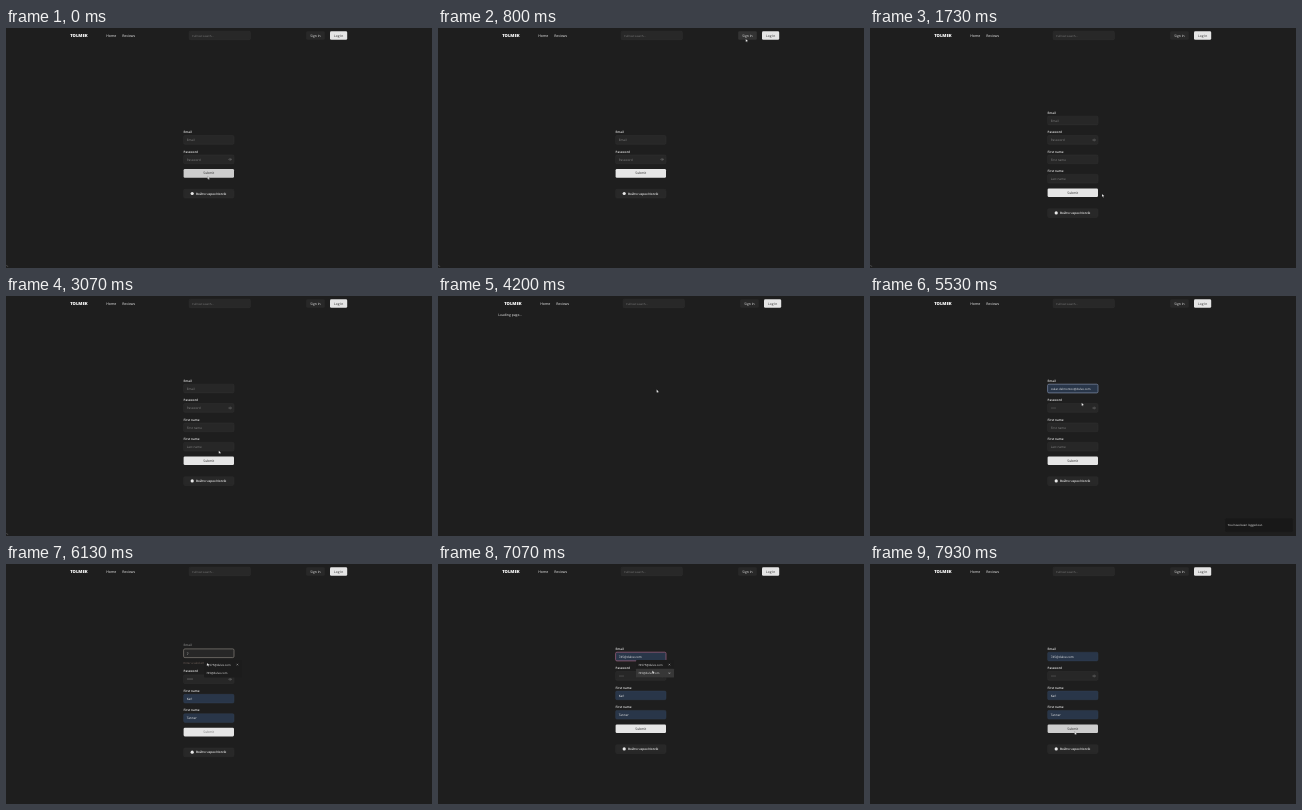
Recreate the animation shown at these times as an HTML page. Size 426 by 240 pixels, loop 8000 ms.

```html
<!DOCTYPE html>
<html lang="en">
<head>
<meta charset="utf-8">
<title>Sign-up form</title>
<style>
  html, body { margin: 0; width: 100%; height: 100%; overflow: hidden; background: #1e1e1e; }
  svg { display: block; width: 426px; height: 240px; }
  text { font-family: "Open Sans", "Noto Sans", sans-serif; text-rendering: geometricPrecision; white-space: pre; }
</style>
</head>
<body>
<svg id="stage" viewBox="0 0 426 240"></svg>
<script>
const LOOP = 8000;
const ROW = 19.4;
const LEFT = 177.6, WIDTH = 50.4;
const stage = document.getElementById('stage');

const MAILS = [
  'valentinogreyshamot@dulve.com', 'oskar.delmontov@dulve.com', 'brasko7171@dulve.com',
  '74575@dulve.com', '7@dulve.com', 'mark@sampler.com'
];
const SHORT_MAILS = ['74575@dulve.com', '745@dulve.com'];

// Pointer stops: time, x, y
const PATH = [
  [0, 201.6, 148.3], [70, 201.6, 148.3], [870, 310, 8], [1400, 310, 8],
  [1730, 232, 166], [2200, 211, 173], [2800, 211, 173], [3670, 218.6, 93.6],
  [4400, 218.6, 93.6], [4600, 207, 92], [5000, 217.3, 114.8], [5400, 217.3, 114.8],
  [5730, 201, 92], [5870, 201, 92], [6130, 201, 99], [6600, 214.3, 106.6],
  [7130, 214.3, 106.6], [7870, 204.6, 167.6], [8000, 204.6, 167.6]
];

const during = (t, from, to) => t >= from && t < to;

function pointerAt(t) {
  const i = Math.max(1, PATH.findIndex(p => p[0] > t));
  const [t0, x0, y0] = PATH[i - 1], [t1, x1, y1] = PATH[i];
  const u = (t - t0) / (t1 - t0), k = u * u * (3 - 2 * u);
  return { x: x0 + (x1 - x0) * k, y: y0 + (y1 - y0) * k };
}

const inside = (p, x, y, w, h) => p.x >= x && p.x <= x + w && p.y >= y && p.y <= y + h;

// Text is placed by the vertical middle of its letters
function text(x, y, str, size = 3.1, fill = '#eee', weight = 400, anchor = 'start') {
  return `<text x="${x}" y="${y + size * 0.36}" font-size="${size}" fill="${fill}" font-weight="${weight}" text-anchor="${anchor}">${str}</text>`;
}

function box(x, y, w, h, fill, stroke = 'none', r = 1.3, line = 0.4) {
  return `<rect x="${x}" y="${y}" width="${w}" height="${h}" rx="${r}" fill="${fill}" stroke="${stroke}" stroke-width="${line}"/>`;
}

function header(p, shift) {
  const hover = inside(p, 300, 3, 19, 9);
  return `<g transform="translate(${shift} 0)">` +
    text(64.2, 7.6, 'TOLMEK', 4.2, '#fff', 800) +
    text(100.2, 7.6, 'Home', 3.6, '#eee', 500) +
    text(116.2, 7.6, 'Reviews', 3.5, '#eee', 500) +
    box(183.2, 3.2, 61.2, 8.5, '#282828', '#343434') +
    text(186.3, 7.6, 'Full text search...', 2.75, '#808080') +
    box(300.2, 3.2, 18.6, 8.5, hover ? '#333' : '#282828') +
    text(309.5, 7.5, 'Sign In', 3.3, '#f2f2f2', 500, 'middle') +
    box(324, 3.2, 17.2, 8.5, '#e5e5e5') +
    text(332.6, 7.5, 'Log In', 3.3, '#222', 500, 'middle') + '</g>';
}

function field(y, label, hint, o = {}) {
  const fill = o.blue ? '#293649' : '#272727';
  return text(LEFT, y, label, 3.1, o.labelFill || '#f0f0f0', 600) +
    box(LEFT, y + 3.6, WIDTH, 8.7, fill, o.stroke || (o.blue ? '#344257' : '#333'), 1.3, o.stroke ? 0.7 : 0.4) +
    text(LEFT + 3.1, y + 8.1, o.value || hint, o.size || 3.1, o.value ? o.fill || '#eee' : '#858585');
}

function eye(y) {
  return `<path d="M222.5 ${y}q1.7-2 3.4 0q-1.7 2-3.4 0z" fill="none" stroke="#777" stroke-width=".4"/>` +
    `<circle cx="224.2" cy="${y}" r=".5" fill="#777"/>`;
}

function emailState(t) {
  if (t < 4600) return {};
  if (t < 5870) {
    const chosen = t >= 4870;
    return { value: chosen ? MAILS[1] : '', size: chosen ? 2.95 : 3.1, blue: chosen, stroke: '#7d8ca6' };
  }
  if (t < 7070) return { value: t < 6070 ? '' : '7', stroke: '#858079', labelFill: '#858585' };
  const fade = Math.max(0, 1 - Math.max(0, t - 7800) / 130);
  return { value: SHORT_MAILS[1], blue: true, stroke: fade ? `rgba(165,100,130,${fade})` : '' };
}

function form(t, p) {
  const signUp = t >= 1000;
  const invalid = during(t, 5870, 7070);
  const top = signUp ? (invalid ? 81.3 : 84.6) : 104;
  const filled = t >= 5870;
  const gap = invalid ? 6.6 : 0;
  const rows = signUp ? 4 : 2;
  const y = i => top + i * ROW + (i ? gap : 0);
  const submit = y(rows) - 1.8;
  const hover = inside(p, LEFT, submit, WIDTH, 8.8);

  let out = field(y(0), 'Email', 'Email', emailState(t));
  if (invalid) out += text(LEFT, 98.5, 'Enter a valid email', 2.8, '#75665f');
  out += field(y(1), 'Password', 'Password', {
    value: t >= 5530 ? (invalid ? '••••••' : '•••••') : '',
    fill: invalid ? '#ddd' : '#a0a0a0', size: t >= 5530 ? 2.7 : 3.1
  }) + eye(y(1) + 8);
  if (signUp) {
    out += field(y(2), 'First name', 'First name', { value: filled && 'Karl', blue: filled });
    out += field(y(3), 'First name', 'Last name', { value: filled && 'Tanner', blue: filled });
  }
  out += box(LEFT, submit, WIDTH, 8.7, hover ? '#cdcdcd' : '#e6e6e6') +
    text(202.8, submit + 4.3, 'Submit', 3.3, invalid ? '#777' : '#222', 500, 'middle');
  const other = submit + 20.3;
  out += box(LEFT, other, WIDTH, 8.7, '#282828', '#2e2e2e') +
    `<circle cx="186.2" cy="${other + 4.2}" r="1.6" fill="#e8e8e8"/>` +
    text(190, other + 4.3, 'Войти через Norvik', 3.1, '#f0f0f0', 600);
  return out;
}

function menu(items, x, y, w, active) {
  const step = 8.56;
  return box(x, y, w, items.length * step + 0.4, '#1c1c1c', 'none', 0.8) +
    items.map((item, i) => {
      const mid = y + 4.5 + i * step;
      return (i === active ? box(x, mid - 4.3, w, step, '#373737', 'none', 0.5) : '') +
        text(x + 2.2, mid, item, 2.85, '#eee', 500);
    }).join('');
}

const cross = (x, y) => `<path d="M${x - 0.8} ${y - 0.8}l1.6 1.6m0-1.6l-1.6 1.6" stroke="#ccc" stroke-width=".4"/>`;

function menus(t) {
  if (during(t, 4660, 5430)) {
    const on = t >= 4870;
    return menu(MAILS, 198, 99.2, 56, on ? 1 : -1) + (on ? cross(249.7, 112.3) : '');
  }
  if (during(t, 6070, 7200)) {
    const active = t >= 7070 ? 1 : -1;
    return menu(SHORT_MAILS, 198, 96.1, 38, active) + cross(231.4, 100.6) +
      (active > 0 ? cross(231.4, 109.2) : '');
  }
  return '';
}

function toast() {
  return box(355, 222.3, 68, 13.6, '#181818', '#202020', 1.5) +
    text(357.8, 229.2, 'You have been logged out.', 2.85, '#eee', 500);
}

function arrow(p) {
  return `<path transform="translate(${p.x} ${p.y})" d="M0 0v2.9l.7-.6.5 1.1.6-.3-.5-1h1z" fill="#fff" stroke="#222" stroke-width=".2"/>`;
}

function draw(now) {
  const t = now % LOOP;
  const p = pointerAt(t);
  const loading = during(t, 4130, 4400);
  let out = box(0, 0, 426, 240, '#1e1e1e', 'none', 0) + header(p, loading ? 2 : 0);
  if (t < 2400 || during(t, 2870, 3300)) {
    out += '<path d="M0 237.6h1q.8 0 .8 1.4" fill="none" stroke="#606060" stroke-width=".5"/>';
  }
  out += loading ? text(60.2, 18.5, 'Loading page...', 3.4, '#eee') : form(t, p) + menus(t);
  if (during(t, 4400, 5930)) out += toast();
  stage.innerHTML = out + arrow(p);
}

function frame() {
  draw(performance.now());
  requestAnimationFrame(frame);
}
frame();
</script>
</body>
</html>
```
